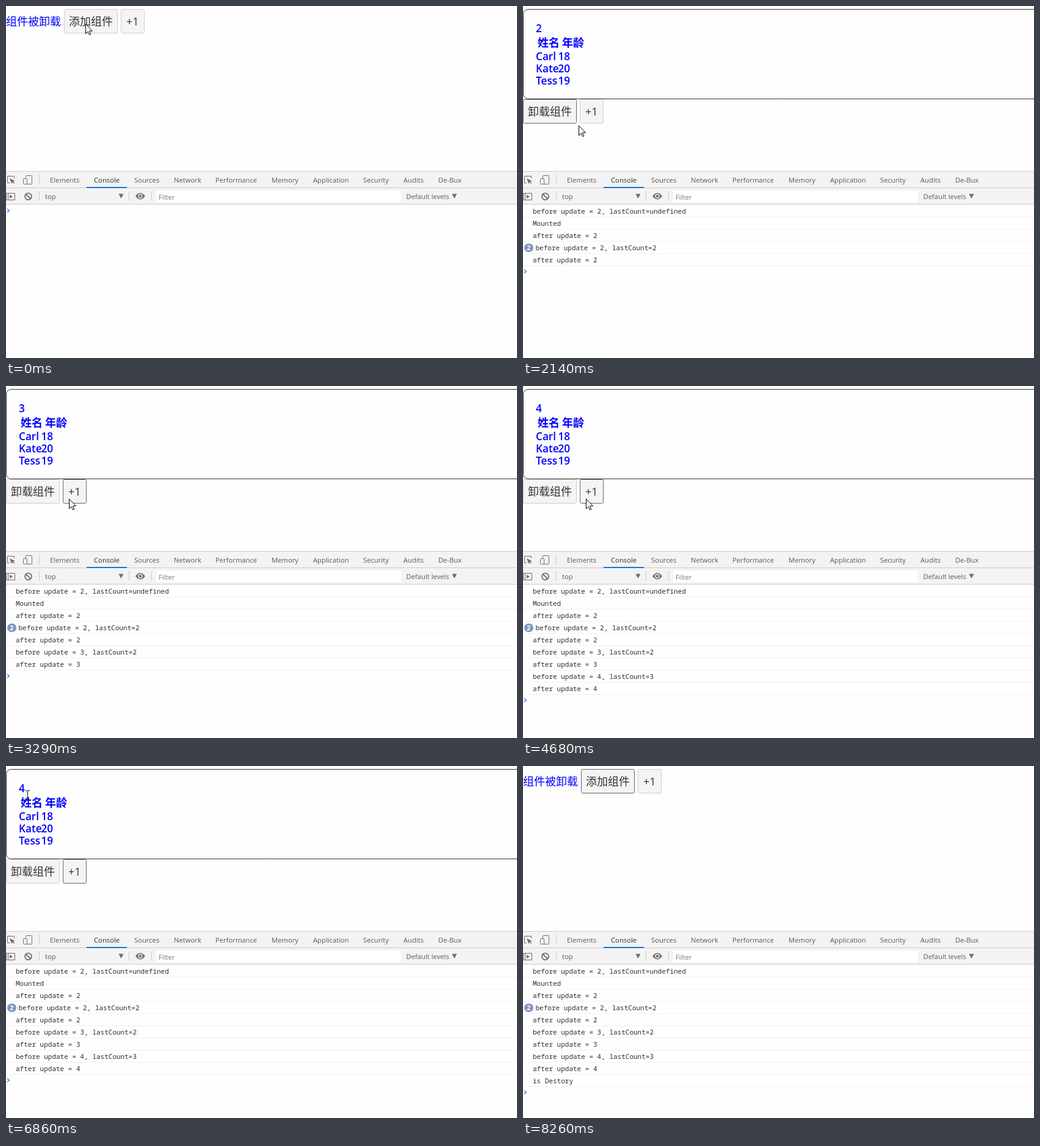
Write an HTML page with a canvas that moves like this. It is 837 px wide and 578 px high and loops after 8.84 s.

```html
<!DOCTYPE html>
<html lang="zh">
<head>
<meta charset="utf-8">
<title>Component lifecycle</title>
<style>
  html, body { margin: 0; width: 100%; height: 100%; overflow: hidden; background: #fefefe; }
  canvas { display: block; }
</style>
</head>
<body>
<canvas id="stage" width="837" height="578"></canvas>
<script>
const ctx = document.getElementById('stage').getContext('2d');
const LOOP = 8840, HOLD = 120, STEP = 130, LEAVE = 8260;
const ROW = 20;
const UI = '"Open Sans", "Noto Sans", sans-serif';
const CJK = '"Noto Sans CJK SC", "Noto Sans CJK", sans-serif';
const MONO = '"Noto Sans Mono", "DejaVu Sans Mono", monospace';
const SMALL = '11.25px ' + UI;
const STRONG = '600 17.2px ' + UI;
const GRAY = '#6e6e6e', BAR = '#f3f3f3', EDGE = '#ccc', INK = '#5a5a5a', BLUE = '#00f';

const people = [['Carl', 18], ['Kate', 20], ['Tess', 19]];
const tabs = ['Elements', 'Console', 'Sources', 'Network', 'Performance',
  'Memory', 'Application', 'Security', 'Audits', 'De-Bux'];

// Each press is released after HOLD, which performs the click.
const clicks = [[1320, 'toggle'], [3170, 'plus'], [4560, 'plus'], [7590, 'toggle']];

// Pointer stops: arrival time, x, y, and number of even steps taken to get there.
const stops = [
  [0, 130, 29], [610, 145, 30], [1720, 160, 70], [1990, 132, 122, 2],
  [2140, 91, 196], [2530, 42, 192, 3], [2890, 103, 185, 3], [5200, 35, 187, 4],
  [5340, 28, 173], [5740, 46, 180, 2], [6580, 14, 43], [6700, 0, 64],
  [6860, 35, 48], [7170, 66, 156, 2], [7470, 70, 168, 2], [8100, 534, 497, 2]
];

function pointerAt(t) {
  let x = 0, y = 0;
  for (const [arrive, toX, toY, steps = 1] of stops) {
    const taken = Math.floor((t - arrive) / STEP + steps);
    const part = Math.max(0, Math.min(1, taken / steps));
    x += (toX - x) * part;
    y += (toY - y) * part;
  }
  return [Math.round(x), Math.round(y)];
}

function stateAt(t) {
  const s = { mounted: false, count: 2, focus: '', press: '', logs: [] };
  const log = (message, times = 1) => s.logs.push({ message, times });
  const update = (last, times) => {
    log(`before update = ${s.count}, lastCount=${last}`, times);
    if (last === undefined) log('Mounted');
    log(`after update = ${s.count}`);
  };
  for (const [at, id] of clicks) {
    if (t < at) break;
    s.focus = id;
    if (t < at + HOLD) {
      s.press = id;
    } else if (id === 'plus') {
      s.count++;
      update(s.count - 1);
    } else {
      s.mounted = !s.mounted;
      if (s.mounted) {
        update(undefined);
        update(s.count, 2);
      } else {
        log('is Destory');
      }
    }
  }
  return s;
}

function rect(x, y, w, h, color) {
  ctx.fillStyle = color;
  ctx.fillRect(x, y, w, h);
}

function text(str, x, y, font, color) {
  ctx.font = font;
  ctx.fillStyle = color;
  ctx.fillText(str, x, y);
}

function paint(fill, stroke, width = 1) {
  if (fill) { ctx.fillStyle = fill; ctx.fill(); }
  if (stroke) { ctx.strokeStyle = stroke; ctx.lineWidth = width; ctx.stroke(); }
}

function path(points, closed) {
  ctx.beginPath();
  points.forEach(([x, y]) => ctx.lineTo(x, y));
  if (closed) ctx.closePath();
}

function box(x, y, w, h, r, fill, stroke) {
  ctx.beginPath();
  ctx.roundRect(x, y, w, h, r);
  paint(fill, stroke);
}

function circle(x, y, r, stroke, width) {
  ctx.beginPath();
  ctx.arc(x, y, r, 0, Math.PI * 2);
  paint(null, stroke, width);
}

function button(id, x, y, w, s) {
  box(x + 0.5, y + 0.5, w - 1, 39, 2,
    s.press === id ? '#ddd' : '#f4f4f4', s.focus === id ? '#666' : EDGE);
}

function drawButtons(x, y, label, s) {
  button('toggle', x, y, 88, s);
  text(label, x + 8, y + 27, '18px ' + CJK, '#333');
  button('plus', x + 93, y, 39, s);
  text('+1', x + 102, y + 27, '18px ' + UI, '#333');
}

function drawApp(s) {
  if (!s.mounted) {
    text('组件被卸载', 0, 32, '18px ' + CJK, BLUE);
    drawButtons(95, 5, '添加组件', s);
    return;
  }
  box(0.5, 5.5, 900, 147, 8, null, '#333');
  text(s.count, 21, 43, STRONG, BLUE);
  text('姓名', 24, 67, 'bold 18px ' + CJK, BLUE);
  text('年龄', 64, 67, 'bold 18px ' + CJK, BLUE);
  people.forEach(([name, age], i) => {
    text(name, 21, 89 + i * ROW, STRONG, BLUE);
    text(age, 57.5, 89 + i * ROW, STRONG, BLUE);
  });
  drawButtons(0, 153, '卸载组件', s);
}

function arrow(x, y, size, fill, stroke) {
  const outline = [[0, 0], [0, 16], [3.6, 12.6], [6.2, 18], [8.3, 17], [6, 11.5], [11, 11.5]];
  path(outline.map(([dx, dy]) => [x + dx * size, y + dy * size]), true);
  paint(fill, stroke);
}

function drawIcons() {
  // element picker
  path([[6, 290.5], [2.5, 290.5], [2.5, 279.5], [13.5, 279.5], [13.5, 283]]);
  paint(null, GRAY);
  ctx.save();
  ctx.translate(6, 283);
  ctx.rotate(-0.35);
  arrow(0, 0, 0.6, GRAY);
  ctx.restore();
  // device toggle
  box(32.5, 278.5, 10, 14, 1, null, GRAY);
  box(28.5, 283.5, 6, 9, 1, BAR, GRAY);
  // sidebar toggle
  box(0.5, 307.5, 14, 11, 0, null, GRAY);
  rect(3, 308, 1, 10, GRAY);
  path([[6, 310], [11, 313], [6, 316]], true);
  paint(GRAY);
  // clear
  circle(36.5, 312.8, 5.5, GRAY, 1.8);
  path([[32.7, 309], [40.3, 316.6]]);
  paint(null, GRAY, 1.8);
  // eye
  ctx.beginPath();
  ctx.moveTo(212, 312.3);
  ctx.quadraticCurveTo(220, 301.7, 228, 312.3);
  ctx.quadraticCurveTo(220, 322.9, 212, 312.3);
  paint(GRAY);
  circle(220, 312.3, 3, BAR, 1.4);
}

function drawToolbars() {
  rect(0, 271, 837, 55, BAR);
  [271, 298, 325].forEach(y => rect(0, y, 837, 1, EDGE));
  rect(132, 297, 66, 2, '#1976d2');
  let x = 72;
  for (const name of tabs) {
    text(name, Math.round(x), 290, SMALL, name === 'Console' ? '#333' : INK);
    x += ctx.measureText(name).width + 23.7;
  }
  rect(54, 277, 1, 16, EDGE);
  [54, 201, 238].forEach(left => rect(left, 304, 1, 16, EDGE));
  rect(246, 303, 401, 19, '#fff');
  text('top', 64, 317, SMALL, INK);
  text('Filter', 250, 318, SMALL, '#777');
  text('Default levels', 655.5, 317, SMALL, INK);
  for (const mid of [188.5, 734.5]) {
    path([[mid - 4, 308.5], [mid + 4, 308.5], [mid, 316]], true);
    paint(GRAY);
  }
  drawIcons();
}

function drawConsole(logs) {
  logs.forEach(({ message, times }, i) => {
    const y = 326 + i * ROW;
    rect(0, y + ROW, 837, 1, '#f0f0f0');
    if (times > 1) {
      box(2, y + 4, 15, 14, 7, '#8097bd');
      text(times, 6.3, y + 15, 'bold 10.5px ' + UI, '#fff');
    }
    text(message, times > 1 ? 20.5 : 16, y + 15, '11px ' + MONO, '#303030');
  });
  const y = 336 + logs.length * ROW;
  path([[2, y - 3], [5.3, y], [2, y + 3]]);
  paint(null, '#3b82f0', 1.5);
}

function drawPointer(x, y, mounted) {
  const overText = mounted && x > 20 && x < 60 && y < 135;
  if (overText) {
    rect(x, y - 7, 1, 14, '#000');
    for (const top of [y - 8, y + 7]) {
      rect(x - 3, top, 3, 1, '#000');
      rect(x + 1, top, 3, 1, '#000');
    }
  } else {
    arrow(x + 0.5, y + 0.5, 1, '#fff', '#000');
  }
}

function draw(t) {
  const s = stateAt(t);
  rect(0, 0, 837, 578, '#fefefe');
  drawApp(s);
  drawToolbars();
  drawConsole(s.logs);
  if (t < LEAVE) drawPointer(...pointerAt(t), s.mounted);
}

const start = performance.now();
function tick() {
  draw((performance.now() - start) % LOOP);
  requestAnimationFrame(tick);
}
tick();
</script>
</body>
</html>
```
